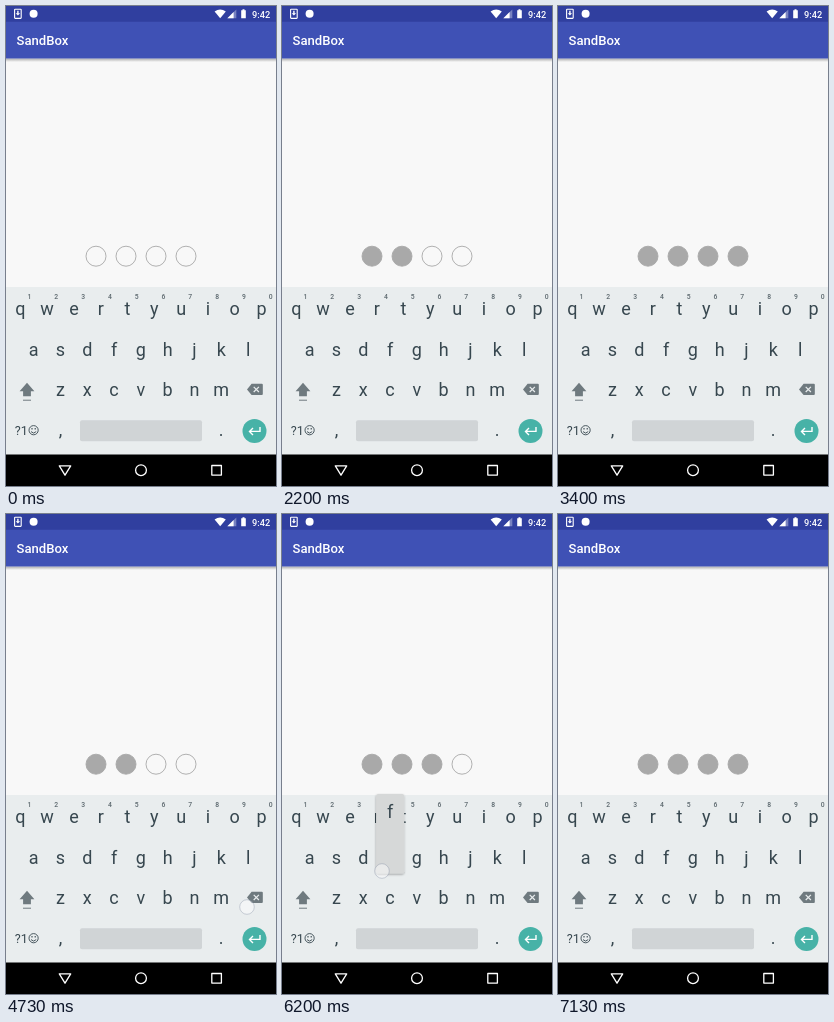
Write an HTML page that moves like this. It is 270 px wide and 480 px high and loops after 9590 ms.

```html
<!DOCTYPE html>
<html lang="en">
<head>
<meta charset="utf-8">
<title>SandBox</title>
<style>
  html, body { margin: 0; width: 100%; height: 100%; overflow: hidden; background: #f8f8f8; }
  svg { display: block; width: 100vw; height: 100vh; font-family: Roboto, "Open Sans", sans-serif; }
  .key { font-size: 18px; fill: #37474f; text-anchor: middle; }
  .hint { font-size: 6.8px; font-weight: 500; fill: #5c686e; text-anchor: middle; }
  .pin { stroke: #a9a9a9; stroke-width: .9; }
  .touch { fill: #fff; fill-opacity: .62; stroke: #76829a; stroke-opacity: .5; stroke-width: .9; }
</style>
</head>
<body>
<svg viewBox="0 0 270 480" preserveAspectRatio="none">
  <defs>
    <linearGradient id="drop" x1="0" y1="0" x2="0" y2="1">
      <stop offset="0" stop-color="#000" stop-opacity=".3"/>
      <stop offset="1" stop-color="#000" stop-opacity="0"/>
    </linearGradient>
    <filter id="soft" x="-30%" y="-10%" width="160%" height="125%">
      <feDropShadow dx="0" dy="1" stdDeviation="1" flood-opacity=".35"/>
    </filter>
  </defs>

  <rect width="270" height="480" fill="#f8f8f8"/>
  <rect y="52.5" width="270" height="3.5" fill="url(#drop)"/>
  <rect width="270" height="52.5" fill="#3f51b5"/>
  <rect width="270" height="15.75" fill="#303f9f"/>
  <text x="10.5" y="39" font-size="13.1" font-weight="500" fill="#fff">SandBox</text>

  <!-- status bar -->
  <g fill="#fff">
    <rect x="8.6" y="3.2" width="6.6" height="9.2" rx=".6" fill="none" stroke="#fff" stroke-width="1.1"/>
    <path d="M11.2 4.8h1.4v2.4h1.5l-2.2 2.4l-2.2-2.4h1.5z"/>
    <circle cx="27.6" cy="7.7" r="4"/>
    <path d="M214.2 12.3L208.6 5.4Q214.2 1.4 219.8 5.4z"/>
    <path d="M230.3 3.4V12.3H221.4z" fill-opacity=".35"/>
    <path d="M227.6 6.1V12.3H221.4z"/>
    <path d="M235.2 4.3h1.3v-1h2v1h1.3v8h-4.6z"/>
    <text x="246" y="11.5" font-size="9.2" font-weight="500">9:42</text>
  </g>

  <g id="pins"></g>

  <!-- keyboard -->
  <rect y="281" width="270" height="168" fill="#e9edee"/>
  <rect id="held" x="230" y="365" width="37" height="36" rx="2" fill="#d3d8da" visibility="hidden"/>
  <g id="keys"></g>
  <g fill="#6f7a7f">
    <path d="M21 376.8L28.4 385.2H24.9V390.3H17.1V385.2H13.6z"/>
    <rect x="17" y="393.7" width="8" height="1"/>
    <path d="M245.6 377.8H255.8q1 0 1 1V388q0 1-1 1H245.6L241 383.4z"/>
    <path d="M247.7 380.8l5.2 5.2m0-5.2l-5.2 5.2" stroke="#e9edee" stroke-width="1.2"/>
  </g>
  <text x="8.8" y="428.6" font-size="12.6" fill="#37474f">?1</text>
  <g fill="none" stroke="#37474f" stroke-width=".9">
    <circle cx="27.6" cy="424.2" r="4.6"/>
    <path d="M25 425.6q2.6 3 5.2 0"/>
    <path d="M26 422.1v1.4m3.2-1.4v1.4" stroke-width="1.1"/>
  </g>
  <rect x="74" y="414.2" width="122" height="21" rx="2" fill="#d0d4d6"/>
  <circle cx="248.5" cy="425" r="12" fill="#47b2a7"/>
  <path d="M254 421v4.4h-10.4m3.4-3.5l-3.5 3.5l3.5 3.5" fill="none" stroke="#fff" stroke-width="1.4"/>

  <!-- navigation bar -->
  <rect y="448.5" width="270" height="31.5"/>
  <g fill="none" stroke="#fff" stroke-width="1.3" stroke-linejoin="round">
    <path d="M53.3 459.8H64.7L59 469.2z"/>
    <circle cx="135" cy="464.2" r="5.4"/>
    <rect x="205.8" y="459.5" width="9.6" height="9.6"/>
  </g>

  <g id="popup" visibility="hidden">
    <rect x="-14" y="-63" width="28" height="79.5" rx="2" fill="#d6d8d8" filter="url(#soft)"/>
    <text class="key" y="-39"></text>
  </g>
  <g id="touches"></g>
</svg>
<script>
const LOOP = 9590, FPS = 15, FADE = 170, LINGER = 100;
const SHAKE = { time: 600, cycles: 2, size: 25, starts: [2771, 6531] };
const PITCH = 26.8;
const ROWS = [
  ['qwertyuiop', 14.3, 308.5],
  ['asdfghjkl', 27.7, 349.5],
  ['zxcvbnm', 54.4, 390.3]
];
// key, finger down, finger up, finger x, finger y
const PRESSES = [
  ['q', 525, 630, 13, 306],
  ['q', 1590, 1740, 14, 305],
  ['q', 2390, 2510, 13, 307],
  ['q', 2600, 2771, 14, 306],
  ['del', 4260, 4350, 243, 391],
  ['del', 4525, 4690, 241, 393],
  ['del', 4760, 4830, 242, 392],
  ['del', 4900, 4960, 242, 391],
  ['f', 5725, 5820, 98.5, 340.5],
  ['h', 5925, 6010, 157, 347],
  ['f', 6120, 6160, 100, 357],
  ['f', 6460, 6531, 101, 354]
].map(([key, down, up, x, y]) => ({ key, down, up, x, y }));

const $ = id => document.getElementById(id);

function add(parent, tag, attrs, text = '') {
  const el = document.createElementNS('http://www.w3.org/2000/svg', tag);
  for (const name in attrs) el.setAttribute(name, attrs[name]);
  el.textContent = text;
  return parent.appendChild(el);
}

const show = (el, on) => el.setAttribute('visibility', on ? 'visible' : 'hidden');

const spots = {};
for (const [letters, left, y] of ROWS) {
  [...letters].forEach((letter, i) => {
    const x = left + i * PITCH;
    spots[letter] = { x, y };
    add($('keys'), 'text', { class: 'key', x, y }, letter);
  });
}
for (let i = 0; i < 10; i++) {
  add($('keys'), 'text', { class: 'hint', x: 23.5 + i * PITCH, y: 293 }, (i + 1) % 10);
}
add($('keys'), 'text', { class: 'key', x: 54.6, y: 430 }, ',');
add($('keys'), 'text', { class: 'key', x: 215, y: 430 }, '.');

const pins = [0, 1, 2, 3].map(i =>
  add($('pins'), 'circle', { class: 'pin', cx: 90 + i * 30, cy: 250.2, r: 10 }));
for (const p of PRESSES) {
  p.dot = add($('touches'), 'circle', { class: 'touch', cx: p.x, cy: p.y, r: 7.3 });
}
const popup = $('popup'), label = popup.querySelector('text');

function shakeAt(t) {
  const start = SHAKE.starts.find(s => t >= s && t < s + SHAKE.time);
  if (start === undefined) return 0;
  return SHAKE.size * Math.sin(2 * Math.PI * SHAKE.cycles * (t - start) / SHAKE.time);
}

function render(t) {
  let count = 0, held = false, active = null;
  for (const p of PRESSES) {
    const erase = p.key === 'del';
    if (erase) {
      if (t >= p.down) count--;
      held = held || (t >= p.down && t < p.up);
    } else {
      if (t >= p.up) count++;
      if (t >= p.down && t < p.up + LINGER) active = p;
    }
    const alpha = t < p.down ? 0 : Math.min(1, Math.max(0, 1 - (t - p.up) / FADE));
    p.dot.setAttribute('opacity', alpha);
  }
  pins.forEach((pin, i) => pin.setAttribute('fill', i < count ? '#a9a9a9' : 'none'));
  $('pins').setAttribute('transform', `translate(${shakeAt(t)} 0)`);
  show($('held'), held);
  show(popup, active);
  if (active) {
    const { x, y } = spots[active.key];
    popup.setAttribute('transform', `translate(${x} ${y - 6.5})`);
    label.textContent = active.key;
  }
}

const begin = performance.now();
function tick() {
  const t = (performance.now() - begin) % LOOP;
  render(Math.floor((t + 4) * FPS / 1000) * 1000 / FPS);
  requestAnimationFrame(tick);
}
tick();
</script>
</body>
</html>
```
